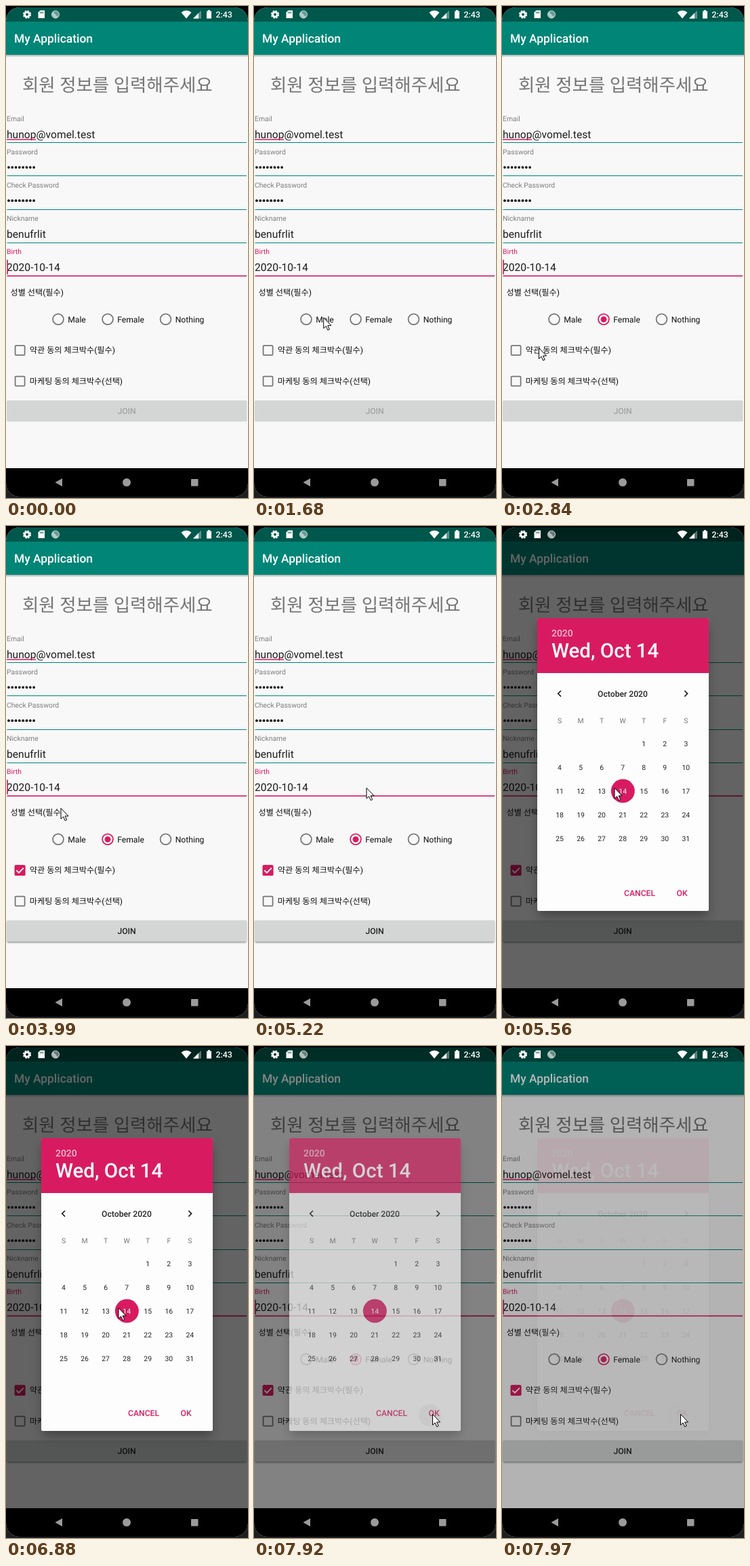
Animation, 357 px wide and 726 px high, one loop 8 s. Source, as an HTML page:

```html
<!DOCTYPE html>
<html lang="ko">
<head>
<meta charset="utf-8">
<title>Sign-up form</title>
<style>
html, body { margin: 0; width: 100%; height: 100%; overflow: hidden; background: #1d1f20; }
svg { display: block; width: 357px; height: 726px; }
text {
  font-family: Roboto, 'Noto Sans CJK KR', 'Noto Sans CJK JP', sans-serif;
  white-space: pre; text-rendering: geometricPrecision;
}
.med { font-weight: 500; }
.mid { text-anchor: middle; }
</style>
</head>
<body>
<svg id="stage" viewBox="0 0 357 726" xmlns="http://www.w3.org/2000/svg">
  <defs>
    <clipPath id="screen"><rect y="2" width="357" height="722" rx="20"/></clipPath>
    <linearGradient id="barShade" x2="0" y2="1">
      <stop stop-color="#000" stop-opacity=".3"/><stop offset="1" stop-color="#000" stop-opacity="0"/>
    </linearGradient>
    <filter id="soft" x="-20%" y="-20%" width="140%" height="140%"><feGaussianBlur stdDeviation="8"/></filter>
    <filter id="thin" x="-5%" y="-30%" width="110%" height="160%"><feGaussianBlur stdDeviation="1"/></filter>
  </defs>
  <rect width="357" height="40"/>
  <g clip-path="url(#screen)">
    <rect width="357" height="726" fill="#f8f8f8"/>
    <rect width="357" height="23" fill="#00574b"/>
    <rect y="23" width="357" height="49" fill="#008577"/>
    <rect y="72" width="357" height="4" fill="url(#barShade)"/>
    <g id="form"></g>
    <rect id="dim" y="2" width="357" height="680"/>
    <g fill="#fff">
      <circle cx="31" cy="12.5" r="3.4" fill="none" stroke="#fff" stroke-width="2.8"/>
      <circle cx="31" cy="12.5" r="5.3" fill="none" stroke="#fff" stroke-width="1.7" stroke-dasharray="2.6 1.56"/>
      <path d="M50.5 6.5H57V18H47.5V9.5Z"/>
      <path d="M50.5 8.5v2.5M52.5 8.5v2.5M54.5 8.5v2.5" stroke="#00574b"/>
      <circle cx="73" cy="12.5" r="5.5" fill-opacity=".4" stroke="#fff" stroke-opacity=".75"/>
      <path d="M69.5 8.5a5.3 5.3 0 0 0 7 7.8Z" fill-opacity=".5"/>
      <path d="M258.5 9.5Q266 3.5 273.5 9.5L266 18.5Z"/>
      <path d="M288 6.5V18.5H276Z" fill-opacity=".35"/>
      <path d="M284 10.5V18.5H276Z"/>
      <path d="M296 7.5h2V6h3v1.5h2V18.5h-7Z"/>
      <text class="med" x="309.5" y="17" font-size="12.3">2:43</text>
    </g>
    <rect y="682" width="357" height="44"/>
    <g fill="#9b9b9b">
      <path d="M72.5 703L83 697V709Z"/>
      <circle cx="178" cy="703" r="6"/>
      <rect x="273" y="698" width="10.5" height="10.5" rx=".8"/>
    </g>
    <g id="dialog"></g>
  </g>
  <path id="cursor" d="M.5 .5V16.2L4.1 12.9L6.7 18.8L9.2 17.7L6.6 12H11.6Z" fill="#fff" stroke="#000"/>
</svg>
<script>
const LOOP = 8000, PINK = '#d81b60', TEAL = '#008577', GREY = '#757575', INK = '#222';
const $ = id => document.getElementById(id);
const text = (x, y, size, fill, str, cls = '') =>
  `<text x="${x}" y="${y}" font-size="${size}" fill="${fill}" class="${cls}">${str}</text>`;
const rect = (x, y, w, h, fill, extra = '') =>
  `<rect x="${x}" y="${y}" width="${w}" height="${h}" fill="${fill}" ${extra}/>`;
const circle = (x, y, r, fill, extra = '') =>
  `<circle cx="${x}" cy="${y}" r="${r}" fill="${fill}" ${extra}/>`;
const outline = `stroke="${GREY}" stroke-width="1.75"`;

function buildForm() {
  const dots = y => Array.from({ length: 8 }, (_, i) => circle(4 + i * 5.3, y, 1.9, '#111')).join('');
  const fields = [['Email', 'hunop@vomel.test'], ['Password'], ['Check Password'],
    ['Nickname', 'benufrlit'], ['Birth', '2020-10-14']];
  let s = text(12, 54, 17.4, '#fff', 'My Application', 'med')
    + text(24, 126, 26.45, GREY, '회원 정보를 입력해주세요');
  fields.forEach(([label, value], i) => {
    const y = 169.5 + i * 49.1, birth = label === 'Birth';
    s += text(1, y, 10.4, birth ? PINK : '#7d7d7d', label)
      + (value ? text(1, y + 25.5, 15.63, '#1c1c1c', value) : dots(y + 19.5))
      + (birth ? rect(1.5, 397.5, 353.5, 1.7, PINK)
        : rect(1.5, Math.round(201 + i * 49.3), 353.5, 1, TEAL));
  });
  s += rect(1, 196.3, 43, 1.5, PINK)
    + rect(1.3, 374.5, 1.7, 21.5, PINK, 'id="caret"')
    + text(6.5, 427, 12.15, '#111', '성별 선택(필수)');
  [[77, 'Male'], [150, 'Female'], [235.5, 'Nothing']].forEach(([x, name]) => {
    s += circle(x, 462.3, 7.9, 'none', `id="ring${name}" ${outline}`)
      + text(x + 14.2, 467, 12.15, '#111', name);
  });
  s += circle(150, 462.3, 4.4, PINK, 'id="dot"');
  [[508, '약관 동의 체크박수(필수)'], [553.5, '마케팅 동의 체크박수(선택)']].forEach(([y, name]) => {
    s += rect(13.6, y - 7, 14, 14, 'none', `rx="1" ${outline}`)
      + text(34.8, y + 4.3, 12.15, '#111', name);
  });
  s += `<g id="tick">${rect(12.7, 500.2, 15.7, 15.7, PINK, 'rx="1.7"')}
      <path d="M15.4 508.2l3.5 3.5l7-7" fill="none" stroke="#fff" stroke-width="1.8"/></g>`
    + circle(150, 462.3, 0, PINK, 'id="radioRipple"')
    + circle(20.5, 508, 0, PINK, 'id="boxRipple"')
    + rect(1.5, 583, 353, 32, '#000', 'id="lift" rx="2" filter="url(#thin)"')
    + rect(1, 582, 354.5, 31.3, '#d4d5d5', 'rx="1.7"')
    + `<g id="join">${text(178, 602.3, 12.15, '', 'JOIN', 'med mid')}</g>`;
  $('form').innerHTML = s.replace('fill=""', '');
}

function buildDialog() {
  const col = i => 85 + i * 31.05;
  let s = rect(54, 147, 249, 428, '#000', 'opacity=".34" filter="url(#soft)"')
    + rect(52, 136, 253, 432, '#fdfdfd', 'rx="2"')
    + `<path d="M52 217V138a2 2 0 0 1 2-2H303a2 2 0 0 1 2 2V217Z" fill="${PINK}"/>`
    + text(73, 163, 13.9, 'rgba(255,255,255,.7)', '2020', 'med')
    + text(73, 194.3, 29.5, '#fff', 'Wed, Oct 14', 'med')
    + text(178, 251.5, 12.15, INK, 'October 2020', 'med mid')
    + `<path d="M87 243l-4.3 4.3l4.3 4.3M269.3 243l4.3 4.3l-4.3 4.3" fill="none" stroke="${INK}" stroke-width="1.7"/>`
    + circle(178.3, 391, 17.5, PINK);
  [...'SMTWTFS'].forEach((d, i) => s += text(col(i), 291, 10.4, GREY, d, 'mid'));
  for (let day = 1; day <= 31; day++) {
    const cell = day + 3;
    s += text(col(cell % 7), 324.7 + Math.floor(cell / 7) * 35.1, 10.4,
      day === 14 ? '#fff' : INK, day, 'mid');
  }
  s += circle(259.5, 545, 0, '#000', 'id="okRipple"')
    + text(180, 546, 12.15, PINK, 'CANCEL', 'med')
    + text(257.5, 546, 12.15, PINK, 'OK', 'med');
  $('dialog').innerHTML = s;
}

const ramp = (t, a, b) => Math.max(0, Math.min(1, (t - a) / (b - a)));
const ease = p => p * p * (3 - 2 * p);
const set = (id, attrs) => Object.entries(attrs).forEach(([k, v]) => $(id).setAttribute(k, v));

// Pointer strokes: [start, end, x, y]
const strokes = [
  [670, 1450, 91.5, 458],    // to the radio buttons
  [1530, 2140, 161, 467],    // to Female
  [2310, 3090, 20, 516],     // to the first checkbox
  [3240, 3990, 80.5, 416],   // up to the birth field
  [3990, 4180, 77, 377],
  [4990, 5220, 165.5, 386],  // along the field
  [6960, 7410, 258, 543],    // to OK
  [7650, 7730, 263, 543]
];

function pointer(t) {
  let x = 283, y = 697;
  for (const [a, b, toX, toY] of strokes) {
    const p = ease(ramp(t, a, b));
    x += (toX - x) * p;
    y += (toY - y) * p;
  }
  // circling around the chosen day
  const p = ramp(t, 6110, 6880), r = 30 * Math.sin(Math.PI * p), turn = 4 * Math.PI * p;
  return [x + r * Math.cos(turn), y + r * Math.sin(turn)];
}

function caretOn(t) {
  if (t >= 5560 && t < 7890) return false;
  const shown = [-160, 4550, 5330, 7890].findLast(s => s <= t);
  return t < 4550 || t >= 5330 ? (t - shown) % 1000 < 500 : t - shown < 500;
}

function ripple(id, t, start, size, alpha) {
  set(id, {
    r: size * ramp(t, start - 60, start + 120),
    opacity: t < start ? 0 : alpha * (1 - ramp(t, start + 150, start + 380))
  });
}

function draw(t) {
  set('caret', { opacity: +caretOn(t) });
  set('ringFemale', { stroke: t >= 2310 ? PINK : GREY });
  set('dot', { r: 4.4 * ramp(t, 2260, 2450) });
  set('tick', { opacity: t < 3240 ? 0 : ramp(t, 3180, 3320) });
  ripple('radioRipple', t, 2310, 17.4, .16);
  ripple('boxRipple', t, 3240, 17.4, .16);
  ripple('okRipple', t, 7650, 16.5, .1);
  set('join', { fill: t >= 3240 ? INK : '#a3a4a4' });
  set('lift', { opacity: .38 * ramp(t, 3200, 3400) });
  set('dim', { opacity: .6 * ramp(t, 5265, 5490) * (1 - ramp(t, 7890, 8042)) });
  set('dialog', { opacity: ramp(t, 5250, 5400) * (1 - ramp(t, 7890, 7977)) });
  set('cursor', { opacity: +(t >= 670), transform: `translate(${pointer(t)})` });
}

buildForm();
buildDialog();
const begin = performance.now();
function loop() {
  draw((performance.now() - begin) % LOOP);
  requestAnimationFrame(loop);
}
loop();
</script>
</body>
</html>
```
